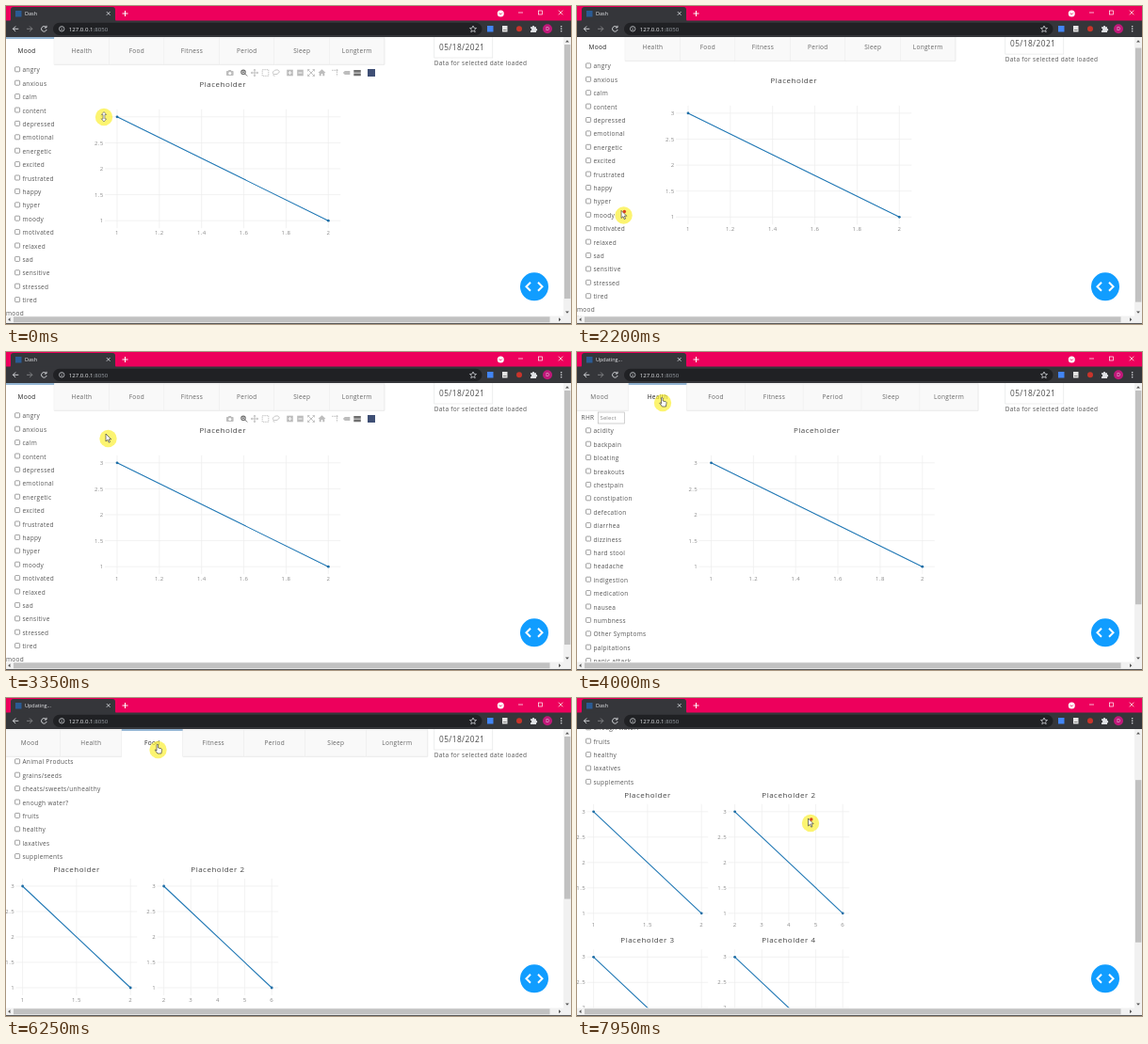
An HTML page that plays this animation: 600 px wide and 338 px high, repeating every 8000 ms.

```html
<!DOCTYPE html>
<html lang="en">
<head>
<meta charset="utf-8">
<title>Dash</title>
<style>
html, body { margin: 0; width: 100%; height: 100%; overflow: hidden; background: #fff; }
svg { display: block; width: 100%; height: 100%; }
text { font-family: "Open Sans", "Noto Sans", sans-serif; font-size: 6.5px; letter-spacing: .32px; fill: #555; }
.ui { letter-spacing: 0; fill: #e8eaed; }
.title { font-size: 8px; letter-spacing: .5px; fill: #444; }
.tick { font-size: 6px; letter-spacing: .4px; fill: #888; }
.date { font-size: 8.3px; letter-spacing: .42px; fill: #484848; }
</style>
</head>
<body>
<svg id="stage" viewBox="0 0 600 338"></svg>
<script>
const LOOP = 8000, STEP = 50, TOP = 33, VIEW_H = 296;
const TABS = ['Mood', 'Health', 'Food', 'Fitness', 'Period', 'Sleep', 'Longterm'];
const MOODS = 'angry,anxious,calm,content,depressed,emotional,energetic,excited,frustrated,happy,hyper,moody,motivated,relaxed,sad,sensitive,stressed,tired'.split(',');
const SYMPTOMS = 'acidity,backpain,bloating,breakouts,chestpain,constipation,defecation,diarrhea,dizziness,hard stool,headache,indigestion,medication,nausea,numbness,Other Symptoms,palpitations,panic attack'.split(',');
const FOODS = 'Animal Products,grains/seeds,cheats/sweets/unhealthy,enough water?,fruits,healthy,laxatives,supplements'.split(',');

// markup helpers
const attrs = o => Object.entries(o).map(([k, v]) => ` ${k}="${v}"`).join('');
const rect = (x, y, w, h, fill, more = {}) =>
  `<rect${attrs({ x, y, width: w, height: h, fill, ...more })}/>`;
const circle = (cx, cy, r, fill, more = {}) => `<circle${attrs({ cx, cy, r, fill, ...more })}/>`;
const line = (d, stroke, width = 1, more = {}) =>
  `<path${attrs({ d, stroke, 'stroke-width': width, fill: 'none', ...more })}/>`;
const shape = (d, fill, more = {}) => `<path${attrs({ d, fill, ...more })}/>`;
const text = (x, y, s, more = {}) => `<text${attrs({ x, y, ...more })}>${s}</text>`;
const group = (id, body, more = {}) => `<g${attrs({ id, ...more })}>${body}</g>`;

function tabBar(active, width) {
  let out = '';
  TABS.forEach((name, i) => {
    const x = -7.2 + i * width, on = i === active;
    out += rect(x, 33.5, width, 28.8, on ? '#fff' : '#f9f9f9');
    out += line(`M${x + width} 33.5V62.3` + (on ? '' : `H${x}`), '#dedede', .6);
    out += line(`M${x} 34H${x + width}`, on ? '#2b6ca8' : '#dedede', on ? 1.1 : .5);
    out += text(x + width / 2, 50, name, {
      'text-anchor': 'middle',
      style: on ? 'fill:#222;font-weight:500' : 'fill:#666'
    });
  });
  return out;
}

function dateBox() {
  return rect(454.8, 32, 62, 23, '#fff', { stroke: '#dfe2e2', 'stroke-width': .6 }) +
    text(460, 47.4, '05/18/2021', { class: 'date' }) +
    text(454.8, 62.5, 'Data for selected date loaded');
}

function checklist(items, y0) {
  return items.map((s, i) => {
    const y = y0 + i * 14.4;
    return rect(9.6, y - 3.2, 5, 5, '#fff', { rx: .8, stroke: '#777', 'stroke-width': .7 }) +
      text(17.4, y + 2.3, s);
  }).join('');
}

function chart(title, x0, x1, y0, y1, xTicks, pad, titleY) {
  const cx = (x0 + x1) / 2, grid = { stroke: '#ececec', width: .7 };
  let out = '';
  xTicks.forEach((s, i) => {
    const x = x0 + (x1 - x0) * i / (xTicks.length - 1);
    out += line(`M${x} ${y0 - 8}V${y1 + 8}`, grid.stroke, grid.width);
    out += text(x, y1 + 14.6, s, { class: 'tick', 'text-anchor': 'middle' });
  });
  ['3', '2.5', '2', '1.5', '1'].forEach((s, i) => {
    const y = y0 + (y1 - y0) * i / 4;
    out += line(`M${x0 - pad} ${y}H${x1 + pad}`, grid.stroke, grid.width);
    out += text(x0 - (pad > 10 ? 14.3 : 8.6), y + 2.2, s, { class: 'tick', 'text-anchor': 'end' });
  });
  out += line(`M${x0} ${y0}L${x1} ${y1}`, '#1f77b4', 1.1);
  out += circle(x0, y0, 1.4, '#1f6ea6') + circle(x1, y1, 1.4, '#1f6ea6');
  return out + text(cx, titleY, title, { class: 'title', 'text-anchor': 'middle' });
}

function modebar() {
  const pale = '#bdbdbd', dark = '#707070', y = 71;
  return rect(234, 69, 7.6, 5, pale, { rx: .8 }) + rect(236.2, 68, 3, 2, pale) + circle(237.8, 71.5, 1.5, '#fff') +
    circle(252, 70.3, 2.2, 'none', { stroke: dark, 'stroke-width': 1.2 }) +
    line('M253.7 72l2.5 2.5M251 70.3h2M252 69.3v2', dark, 1) +
    line(`M260.5 ${y}h7M264 67.5v7`, pale, .9) +
    shape('M264 66.7l1.5 1.9h-3zM264 75.3l1.5-1.9h-3zM259.7 71l1.9-1.5v3zM268.3 71l-1.9-1.5v3z', pale) +
    rect(272.2, 67.7, 6.6, 6.6, 'none', { stroke: pale, 'stroke-width': .9, 'stroke-dasharray': '1.4 .8' }) +
    line('M284 72.5c-2-3 2-5 4.500-4.500c3 1 1.500 4-1.500 4.500c-2 .3-3-.5-3 .8l1.200 1.500', pale, .9) +
    rect(298.200, 67.700, 6.600, 6.600, pale) + line('M299.500 71h4M301.500 69v4', '#fff', .9) +
    rect(309.200, 67.700, 6.600, 6.600, pale) + line('M310.500 71h4', '#fff', .9) +
    line('M320.500 67.500l7 7M327.500 67.500l-7 7', pale, .9) +
    line('M320.500 69.500v-2h2M325.500 67.500h2v2M327.500 72.500v2h-2M322.500 74.500h-2v-2', pale, .8) +
    shape('M335.500 67.200l4 3.800h-1.200v3.300h-2v-2.300h-1.600v2.300h-2V71h-1.200z', pale) +
    line('M346 68.300h4.500M351.500 69.500v5', pale, .9, { 'stroke-dasharray': '1.600 .8' }) + circle(351.500, 68.300, 1, pale) +
    shape('M357.800 71l2-2h5.500v4h-5.500z', pale) +
    shape('M369.300 68h7.500v2.700h-7.500zM369.300 71.500h7.500v2.700h-7.500z', dark) +
    rect(384, 67, 8, 8, '#3f4f75');
}

function browser() {
  const ink = '#dfe1e5';
  return rect(0, 0, 600, 17, '#ed005c') +
    shape('M2 17Q5 17 5 14V4Q5 1 8 1H113Q116 1 116 4V14Q116 17 119 17Z', '#35363a') +
    rect(0, 15.500, 600, 17.500, '#35363a') +
    rect(10, 5, 6.500, 6.500, '#2b5b94') +
    text(20, 10, 'Dash', { id: 'tabTitle', class: 'ui', style: 'font-size:5.5px' }) +
    line('M106.800 6l3.800 3.800M110.600 6l-3.800 3.800', ink, .8) +
    line('M123.500 8h6M126.500 5v6', '#fff', 1) +
    circle(525.300, 8, 3.500, '#fff') + line('M523.800 7.500l1.500 1.500l1.500-1.500', '#ed005c', .9) +
    line('M544 7h5', '#fff', .7) +
    rect(565.500, 5, 4, 4, 'none', { stroke: '#fff', 'stroke-width': .7 }) +
    line('M586.700 4.700l4.600 4.600M591.300 4.700l-4.600 4.600', '#fff', .7) +
    line('M13.300 24.300H7.500M10.200 21.500L7.400 24.300L10.200 27.100', ink, .9) +
    line('M22 24.300h5.800M25.100 21.500l2.800 2.800l-2.800 2.800', '#85878a', .9) +
    line('M42.500 22.500a2.800 2.800 0 1 0 .6 2.500M43 20.800v2.200h-2.200', ink, .9) +
    rect(50, 17.700, 455.500, 13.300, '#202124', { rx: 6.600 }) +
    circle(59.200, 24.300, 2.700, 'none', { stroke: ink, 'stroke-width': .7 }) +
    line('M59.200 23.800v2M59.200 22.600v.6', ink, .7) +
    `<text class="ui" x="66.800" y="26.600" style="font-size:6.1px">127.0.0.1<tspan fill="#9aa0a6">:8050</tspan></text>` +
    shape('M496 21l1 2.300 2.500.2-1.900 1.700.6 2.500-2.200-1.300-2.200 1.300.6-2.500-1.900-1.700 2.500-.2z', 'none', { stroke: ink, 'stroke-width': .7 }) +
    rect(511, 21, 6.500, 6.500, '#4285f4') +
    rect(527, 21, 5.500, 6.500, '#e4e4e4') + line('M528 25.500h3.500', '#777', .8) +
    circle(545, 24.300, 3, '#c9342b') +
    shape('M557 22.200h1.800a1.200 1.200 0 1 1 2.400 0h1.800v1.800a1.200 1.200 0 1 1 0 2.400v1.600h-6v-1.800a1.200 1.200 0 0 0 0-2.400z', ink) +
    circle(575, 24.300, 5, '#c2187a') +
    text(575, 26.200, 'D', { class: 'ui', 'text-anchor': 'middle', style: 'font-size:5px' }) +
    [21.800, 24.300, 26.800].map(y => circle(589.700, y, .8, ink)).join('');
}

function scrollbars() {
  const bar = '#f1f1f1', arrow = '#555';
  return rect(592, TOP, 8, 305, bar) + rect(0, 329.500, 600, 8, bar) +
    rect(8, 330.300, 569.500, 6, '#c1c1c1') +
    rect(593, 41, 6.300, 270, '#c1c1c1', { id: 'thumb' }) +
    shape('M594 38.500h4l-2-2.300zM594 324.500h4l-2 2.300z', arrow) +
    shape('M4.500 331.300v4l-2.300-2zM587 331.300v4l2.300-2z', arrow) +
    rect(0, 337.200, 600, .8, '#333');
}

const FIFTHS = ['1', '1.2', '1.4', '1.6', '1.8', '2'];
const HALVES = ['1', '1.5', '2'], EVENS = ['2', '3', '4', '5', '6'];
const foodChart = (n, col, row, ticks) => chart('Placeholder' + (n > 1 ? ' ' + n : ''),
  17.600 + col * 150, 132.200 + col * 150, 200 + row * 154.500, 308 + row * 154.500, ticks, 7, 185 + row * 154.500);

const pages = {
  mood: {
    height: 308,
    body: tabBar(0, 58.450) + checklist(MOODS, 68) + text(0, 328.700, 'mood') + text(0, 338, 'None') +
      chart('Placeholder', 118, 342.300, 117.800, 228.200, FIFTHS, 13, 86) + group('modebar', modebar())
  },
  health: {
    height: 366,
    body: tabBar(1, 61.900) + text(4.600, 72.300, 'RHR') +
      rect(22.300, 64, 28, 12, '#fff', { stroke: '#bbb', 'stroke-width': .7 }) +
      text(24.500, 72.200, 'Select', { style: 'fill:#888;font-size:6px;letter-spacing:.1px' }) +
      checklist(SYMPTOMS, 84) + chart('Placeholder', 142.500, 366.800, 117.800, 228.200, FIFTHS, 13, 86)
  },
  food: {
    height: 482,
    body: tabBar(2, 65) + checklist(FOODS, 68) +
      foodChart(1, 0, 0, HALVES) + foodChart(2, 1, 0, EVENS) +
      foodChart(3, 0, 1, HALVES) + foodChart(4, 1, 1, EVENS)
  }
};

const outline = { stroke: '#222', 'stroke-width': .6, 'stroke-linejoin': 'round' };
const pointers = {
  arrow: shape('M-2.500 -5V3l1.900-1.700 1.300 2.900 1.300-.6-1.300-2.800h2.500z', '#fff', outline),
  hand: shape('M-1.500 1V-5.300q.8-1 1.600 0V-2l3.300.8q.8.4.6 1.500l-.6 3.700h-4l-2.700-3.700q.3-1.200 1.800.7z', '#fff', outline),
  cross: line('M-3.500 -.5h8M.5 -4.500v8', '#222', 1.200),
  ns: shape('M0 -5.500l2.600 3h-1.700v4.500h1.700l-2.600 3-2.600-3h1.700v-4.500h-1.700z', '#fff', { ...outline, stroke: '#555' })
};

document.getElementById('stage').innerHTML =
  `<clipPath id="view">${rect(0, TOP, 592, VIEW_H + .5, '#fff')}</clipPath>` +
  rect(0, 0, 600, 338, '#fff') +
  `<g clip-path="url(#view)">` +
  Object.entries(pages).map(([id, p]) => group(id, p.body + dateBox())).join('') + '</g>' +
  circle(561, 298.300, 15, '#119dff') +
  line('M557 293.800l-4.500 4.500 4.500 4.500M565 293.800l4.500 4.500-4.500 4.500', '#fff', 2) +
  scrollbars() + browser() +
  group('cursor', circle(0, 0, 9.200, '#fbf034', { opacity: .7 }) +
    Object.entries(pointers).map(([id, s]) => group(id, s)).join('') +
    circle(.8, -4, 1.700, '#d8431f', { id: 'wheel' }));

// [ms, x, y, pointer until the next stop]
const route = [
  [0, 104, 118, 'ns'], [50, 106, 120, 'cross'], [450, 200, 185, 'cross'], [850, 130, 150, 'cross'],
  [950, 126, 148, 'cross'], [1350, 0, 122, 'cross'], [1400, 0, 122, 'arrow'], [1750, 36, 239, 'arrow'],
  [2150, 40, 235, 'arrow'], [2600, 126, 122, 'arrow'], [2650, 36, 243, 'arrow'], [2850, 31, 248, 'arrow'],
  [2950, 31, 248, 'arrow'], [3350, 108.500, 92, 'arrow'], [3400, 108.500, 92, 'arrow'],
  [3750, 92, 58, 'hand'], [3900, 91, 54, 'hand'], [5000, 91, 54, 'hand'], [5150, 149.500, 53.500, 'hand'],
  [5450, 150, 54, 'hand'], [5750, 150, 54, 'hand'], [6200, 161.500, 55, 'hand'], [6600, 161.500, 55, 'hand'],
  [6700, 155, 75, 'arrow'], [7400, 48, 213, 'arrow'], [7950, 248, 133, 'arrow'], [8000, 248, 133, 'arrow']
];

const el = id => document.getElementById(id);
const show = (id, on) => el(id).setAttribute('display', on ? 'inline' : 'none');
const within = (t, a, b) => t >= a && t < b;
const ramp = (t, a, b) => Math.min(1, Math.max(0, (t - a) / (b - a)));

function draw(t) {
  const page = t < 4000 ? 'mood' : t < 5900 ? 'health' : 'food';
  const scroll = page === 'mood' ? 11.700 * (ramp(t, 2150, 2300) - ramp(t, 2950, 3050))
    : page === 'food' ? 79.200 * ramp(t, 7500, 7900) : 0;
  for (const id in pages) show(id, id === page);
  el(page).setAttribute('transform', `translate(0 ${-scroll})`);
  show('modebar', t < 1550 || within(t, 3100, 3600));

  const scale = 281 / pages[page].height;
  el('thumb').setAttribute('y', 41 + scroll * scale);
  el('thumb').setAttribute('height', VIEW_H * scale);

  const busy = within(t, 100, 250) || within(t, 3900, 4300) || within(t, 5850, 6500);
  el('tabTitle').textContent = busy ? 'Updating...' : 'Dash';

  const i = route.findIndex((k, n) => n + 1 === route.length - 1 || t < route[n + 1][0]);
  const [t0, x0, y0, kind] = route[i], [t1, x1, y1] = route[i + 1], f = ramp(t, t0, t1);
  el('cursor').setAttribute('transform', `translate(${x0 + (x1 - x0) * f} ${y0 + (y1 - y0) * f})`);
  for (const id in pointers) show(id, id === kind);
  show('wheel', within(t, 2150, 2300) || within(t, 2800, 3050) || t >= 7500);
}

const start = performance.now();
function tick() {
  const t = (performance.now() - start) % LOOP;
  draw(Math.floor(t / STEP) * STEP);
  requestAnimationFrame(tick);
}
draw(0);
requestAnimationFrame(tick);
</script>
</body>
</html>
```
